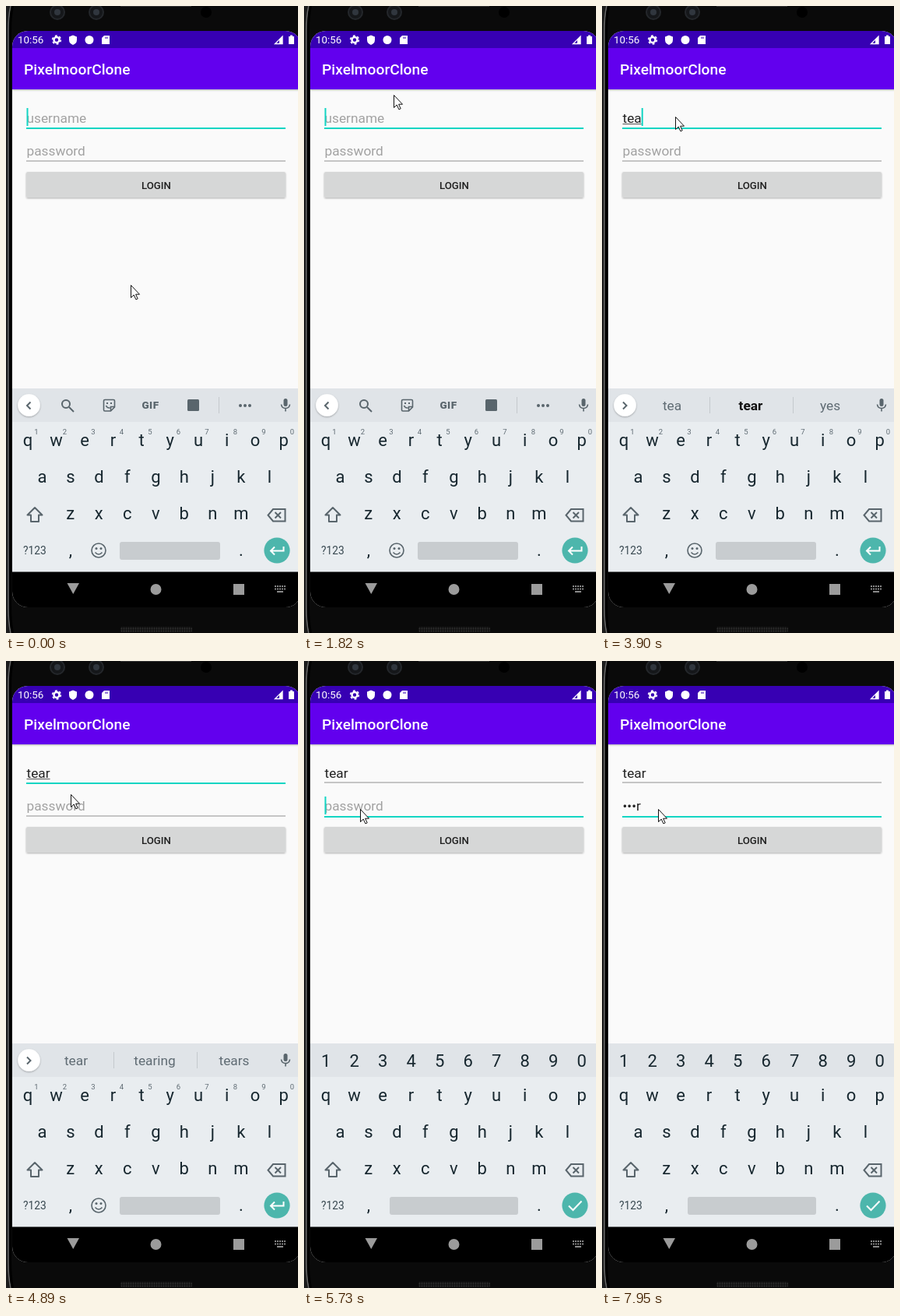
Recreate the animation shown at these times as an HTML page. Size 375 by 805 pixels, loop 8000 ms.

```html
<!DOCTYPE html>
<html lang="en">
<head>
<meta charset="utf-8">
<title>Login screen</title>
<style>
html, body { margin: 0; width: 100%; height: 100%; overflow: hidden; background: #0a0a0a; }
svg { display: block; font-family: Roboto, sans-serif; }
.mid { text-anchor: middle; }
.field { font-size: 17.3px; fill: #222; }
.hint { font-size: 17.3px; fill: #a2a2a2; }
.key { font-size: 22px; fill: #17272f; text-anchor: middle; }
.icon { fill: none; stroke: #59656c; stroke-width: 2; }
.thin { stroke-width: 1.6; }
</style>
</head>
<body>
<svg width="375" height="805" viewBox="0 0 375 805">
  <defs>
    <clipPath id="screen"><rect x="8" y="32" width="371" height="740" rx="20"/></clipPath>
    <filter id="shadow" x="-20%" y="-20%" width="140%" height="150%">
      <feDropShadow dx="0" dy="1" stdDeviation="1" flood-opacity=".3"/>
    </filter>
    <pattern id="mesh" width="3" height="3" patternUnits="userSpaceOnUse">
      <rect width="3" height="3" fill="#111"/><circle cx="1.5" cy="1.5" r=".9" fill="#333"/>
    </pattern>
  </defs>

  <!-- phone body -->
  <rect width="375" height="805" fill="#0a0a0a"/>
  <path d="M0 0H6Q3 12 3 32V772Q3 792 6 805H0z" fill="#1c1c1c"/>
  <path d="M6 0Q3 12 3 32V772Q3 792 6 805" fill="none" stroke="#6a6a6a" stroke-width="1.500"/>
  <path d="M8.500 0Q5.500 14 5.500 34V770Q5.500 790 8.500 805" fill="none" stroke="#000" stroke-width="3"/>
  <path d="M147 0H238" stroke="#333" stroke-width="2"/>
  <g fill="#15171a" stroke="#24272b" stroke-width="2">
    <circle cx="66" cy="8" r="9"/><circle cx="116" cy="8" r="9"/>
  </g>
  <g fill="#30363e"><circle cx="66" cy="8" r="4"/><circle cx="116" cy="8" r="4"/></g>
  <circle cx="257" cy="8" r="7" fill="#000"/>
  <rect x="147" y="797" width="92" height="7" rx="2" fill="url(#mesh)"/>

  <g clip-path="url(#screen)">
    <rect x="8" y="32" width="371" height="740" fill="#fafafa"/>
    <rect x="8" y="54" width="371" height="53" fill="#6200ee" filter="url(#shadow)"/>
    <rect x="8" y="32" width="371" height="22" fill="#3700b3"/>
    <g fill="#fff">
      <text x="15" y="48" font-size="13.400">10:56</text>
      <circle cx="65" cy="43.500" r="3.500" fill="none" stroke="#fff" stroke-width="2.500"/>
      <circle cx="65" cy="43.500" r="5.400" fill="none" stroke="#fff" stroke-width="1.600" stroke-dasharray="2.830"/>
      <path d="M86 37.500l5 2v4q0 4.500-5 6.500q-5-2-5-6.500v-4z"/>
      <circle cx="107" cy="43.500" r="5.500"/>
      <path d="M126 38h7v11h-10v-8z"/>
      <path d="M128 39.500v2.500m2-2.500v2.500" stroke="#3700b3"/>
      <path d="M345.500 48.500H355V39z" fill="none" stroke="#fff" stroke-width="1.300"/>
      <path d="M351 48.500V43l4-4v9.500z"/>
      <path d="M363 39h2v-1.500h3V39h2v10h-7z"/>
      <text x="23" y="88" font-size="19.200" font-weight="500">PixelmoorClone</text>
    </g>

    <!-- form -->
    <text id="userHint" class="hint" x="26.500" y="149.500">username</text>
    <text id="user" class="field" x="26.500" y="149.500"></text>
    <rect id="composing" x="26.500" y="151" height="1" fill="#555"/>
    <rect id="userLine" x="26" width="333"/>
    <text id="passHint" class="hint" x="26.500" y="192">password</text>
    <text id="pass" class="field" x="26.500" y="192"></text>
    <rect id="passLine" x="26" width="333"/>
    <rect id="caret" width="2" height="23" fill="#13d5c3"/>
    <rect x="26" y="213" width="333" height="33" rx="2" fill="#d6d7d7" filter="url(#shadow)"/>
    <text class="mid" x="193" y="235" font-size="13.200" font-weight="500" fill="#202020">LOGIN</text>

    <!-- keyboard -->
    <rect x="8" y="491" width="371" height="236" fill="#e9edf0"/>
    <rect x="8" y="491" width="371" height="43" fill="#e0e4e8"/>
    <g id="strip">
      <circle cx="29.500" cy="512.500" r="14.300" fill="#fff" filter="url(#shadow)"/>
      <path id="chevron" class="icon"/>
      <rect x="356.500" y="504" width="5" height="10" rx="2.500" fill="#59656c"/>
      <path class="icon thin" d="M353.500 511.500q.5 5 5.500 5t5.500-5M359 516.500v4"/>
    </g>
    <g id="tools" fill="#59656c">
      <circle class="icon" cx="77" cy="511" r="5"/><path class="icon" d="M81 515l6 6"/>
      <path class="icon thin" d="M127 505.500h11q1.500 0 1.500 1.500v8l-5 5h-7.500q-1.500 0-1.500-1.500v-11.500q0-1.500 1.500-1.500zM139 514.500h-4.500v5M128.500 513q1.500 3.500 5 3"/>
      <path d="M129 509h2v2h-2zm5 0h2v2h-2z"/>
      <text class="mid" x="185.500" y="517" font-size="13.500" font-weight="900" letter-spacing=".5">GIF</text>
      <rect x="233" y="505" width="15" height="15" rx="1.500"/>
      <rect x="273" y="502" width="1" height="21" fill="#c4c9cd"/>
      <circle cx="301" cy="513" r="2"/><circle cx="307" cy="513" r="2"/><circle cx="313" cy="513" r="2"/>
    </g>
    <g id="suggestions" class="mid" font-size="17.300" fill="#5f6b73">
      <text x="90" y="519"></text><text x="191" y="519"></text><text x="293" y="519"></text>
      <path d="M138.500 502v21M245.500 502v21" stroke="#c4c9cd"/>
    </g>
    <g id="digits"></g>
    <g id="supers" class="mid" font-size="9.500" fill="#5f6b73"></g>
    <g id="letters"></g>
    <path class="icon" d="M37 644l9.500 9.500H42V662H32v-8.500h-4.500z" stroke-linejoin="round"/>
    <path class="icon" d="M343 646h15.500v15.500H343l-6.500-7.750zM345.500 650l7.500 7.500m0-7.500l-7.500 7.500"/>
    <text class="mid" x="37" y="704" font-size="13.800" fill="#37474f">?123</text>
    <text class="key" x="83" y="706">,</text>
    <text class="key" x="302" y="706">.</text>
    <g id="emoji">
      <circle class="icon thin" cx="119" cy="699" r="9"/>
      <path class="icon thin" d="M114.500 701.500q4.500 5 9 0"/>
      <circle cx="116" cy="696.500" r="1.500" fill="#59656c"/><circle cx="122" cy="696.500" r="1.500" fill="#59656c"/>
    </g>
    <rect id="space" y="688" height="23" rx="3" fill="#c8cccf"/>
    <circle cx="348" cy="699" r="16.600" fill="#4db6ac"/>
    <path id="action" fill="none" stroke="#fff" stroke-width="2"/>

    <!-- navigation bar -->
    <rect x="8" y="726.500" width="371" height="46" fill="#000"/>
    <g fill="#9b9b9b">
      <path d="M78.500 741h15.500l-7.750 14z"/><circle cx="192.500" cy="749" r="7"/>
      <rect x="292" y="742" width="14" height="14"/>
      <path d="M345 745h14M345 748.500h14" stroke="#8a8a8a" stroke-width="2" stroke-dasharray="2 1"/>
      <path d="M348 752h8" stroke="#8a8a8a" stroke-width="2"/>
    </g>
  </g>
  <path id="pointer" d="M.5.5V16.500L4.200 13l2.700 5.800 2.300-1-2.600-5.600H11.500z" fill="#fff" stroke="#111"/>
</svg>
<script>
const LOOP = 8000;
const $ = id => document.getElementById(id);
const set = (id, attrs) => { for (const k in attrs) $(id).setAttribute(k, attrs[k]); };
const show = (id, on) => $(id).style.display = on ? '' : 'none';

// [start, x, y]; the pointer jumps between captured positions
const pointerSteps = [
  [0, 160, 358], [120, 157, 510], [240, 152, 652], [610, 180, 710], [730, 229, 785],
  [850, 240, 830], [1090, 278, 707], [1210, 170, 244], [1460, 152, 176], [1580, 132, 108],
  [1700, 120, 74], [1820, 115, 114], [1940, 107, 126], [2060, 99, 135], [2180, 94, 139],
  [2300, 94, 142], [4890, 83, 171], [5010, 76, 184], [5130, 72, 190]
];
const caretFlips = [120, 610, 1090, 1580, 2060, 2540, 3160, 3280, 4890, 5370, 6100, 6470, 7950];
const userSteps = [
  [0, ''], [3280, 't', 't', 'to', 'try'], [3650, 'te', 'te', 'the', 'ten'],
  [3900, 'tea', 'tea', 'tear', 'yes'], [4390, 'tear', 'tear', 'tearing', 'tears']
];
const passSteps = [[0, ''], [6470, 't'], [6840, '•e'], [6960, '••a'], [7450, '•••r']];
const FOCUS_PASS = 5490, SWITCH_KEYS = 5730;

const at = (steps, t) => steps.filter(s => s[0] <= t).pop();

function addRow(group, chars, x, y, cls = 'key') {
  [...chars].forEach((char, i) => {
    const text = document.createElementNS('http://www.w3.org/2000/svg', 'text');
    text.setAttribute('x', x + i * 36.5);
    text.setAttribute('y', y);
    text.setAttribute('class', cls);
    text.textContent = char;
    $(group).append(text);
  });
}
addRow('letters', 'qwertyuiop', 28.1, 565);
addRow('letters', 'asdfghjkl', 46.4, 612);
addRow('letters', 'zxcvbnm', 82.8, 659);
addRow('digits', '1234567890', 28.1, 521);
addRow('supers', '1234567890', 39, 549.5, '');

function drawLine(id, y, focused) {
  set(id, { y: focused ? y : y - .5, height: focused ? 2 : 1, fill: focused ? '#13d5c3' : '#929292' });
}

function render(t) {
  const [, user, ...words] = at(userSteps, t);
  const pass = at(passSteps, t)[1];
  const onPass = t >= FOCUS_PASS, numeric = t >= SWITCH_KEYS;

  $('user').textContent = user;
  $('pass').textContent = pass;
  show('userHint', !user);
  show('passHint', !pass);
  drawLine('userLine', 156, !onPass);
  drawLine('passLine', 199, onPass);

  const userWidth = user ? $('user').getComputedTextLength() : 0;
  const passWidth = pass ? $('pass').getComputedTextLength() : 0;
  set('composing', { width: numeric ? 0 : userWidth });
  set('caret', { x: 26.5 + (onPass ? passWidth : userWidth), y: onPass ? 174 : 131 });
  show('caret', caretFlips.filter(f => f <= t).length % 2 === 0);

  show('strip', !numeric);
  show('tools', !numeric && !user);
  show('suggestions', !numeric && user);
  show('digits', numeric);
  show('supers', !numeric);
  show('emoji', !numeric);
  set('chevron', { d: user ? 'M27 508.500l4.500 4.500-4.500 4.500' : 'M31.500 508.500L27 513l4.500 4.500' });
  document.querySelectorAll('#suggestions text').forEach((el, i) => {
    const best = i === 1 && user.length < 4;
    el.textContent = words[i] || '';
    el.setAttribute('font-weight', best ? 700 : 400);
    el.setAttribute('fill', best ? '#111' : '#5f6b73');
  });
  set('space', numeric ? { x: 110, width: 165 } : { x: 146, width: 129 });
  set('action', { d: numeric ? 'M340 699.500l5.500 5.500 11-11.500' : 'M356.500 694v5.500H340m5-5l-5 5 5 5' });

  const [, x, y] = at(pointerSteps, t);
  set('pointer', { transform: `translate(${x} ${y})` });
}

function tick() {
  render(performance.now() % LOOP);
  requestAnimationFrame(tick);
}
tick();
</script>
</body>
</html>
```
